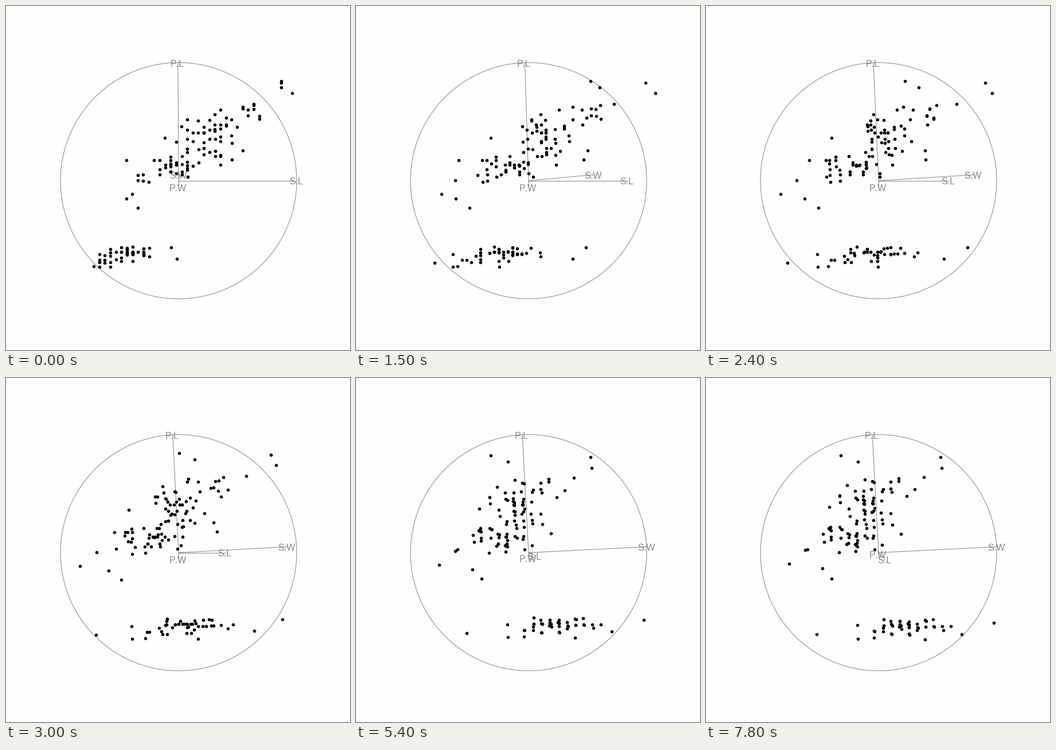
A matplotlib script for the animation above (8 s loop, 600 by 600 pixels).

```python
import numpy as np
import matplotlib.pyplot as plt
from matplotlib.animation import FuncAnimation
from matplotlib.patches import Circle

SIZE, DPI = 600, 100
PX = 72 / DPI                       # one pixel in points
RING_CENTRE, RADIUS = np.array([301, 304.7]), 206
CLOUD_CENTRE, SCALE = np.array([300.4, 304.7]), 348
TICKS, TICK_MS = 80, 100
HOLDS = {1, 8, 10, 16, 25, 31, 36}  # ticks that repeat the previous picture
TURN_END = 39                       # tick at which the sideways turn stops
GREY = "#868686"

NAMES = ["S.L", "S.W", "P.L", "P.W"]
MEAN = np.array([5.843, 3.057, 3.758, 1.199])
SPAN = np.array([3.6, 2.4, 5.9, 2.4])

plt.rcParams["text.kerning_factor"] = 6   # practically no kerning
rng = np.random.default_rng(7)


def cluster(mean, sd, width_corr, petal_corr, outer, total=50):
    """A few outer points plus a correlated normal core, rounded to 0.1."""
    z = np.clip(rng.standard_normal((total - len(outer), 3)), -1.9, 1.9)
    for col, corr in ((1, width_corr), (2, petal_corr)):
        z[:, col] = corr * z[:, 0] + np.sqrt(1 - corr ** 2) * z[:, col]
    return np.vstack([outer, np.round(np.array(mean) + z * sd, 1)])


# Columns: sepal length, sepal width, petal length
flowers = np.vstack([
    cluster((5.0, 3.42, 1.47), (.30, .29, .15), .7, .2,
            [(5.7, 4.4, 1.5), (4.5, 2.3, 1.3), (5.8, 4.0, 1.2),
             (4.3, 3.0, 1.1), (4.6, 3.6, 1.0)]),
    cluster((5.97, 2.81, 4.37), (.44, .23, .33), .4, .6,
            [(5.0, 2.0, 3.5), (6.0, 2.2, 4.0), (4.9, 2.4, 3.3),
             (5.1, 2.5, 3.0), (7.0, 3.2, 4.7)]),
    cluster((6.48, 2.97, 5.45), (.44, .25, .38), .35, .7,
            [(7.7, 2.6, 6.9), (7.7, 2.8, 6.7), (7.7, 3.8, 6.7),
             (7.9, 3.8, 6.4), (4.9, 2.5, 4.5), (7.2, 3.6, 6.1)]),
])
petal_width = np.minimum(0.416 * flowers[:, 2] - 0.363, 2.1)
data = (np.column_stack([flowers, petal_width]) - MEAN) / SPAN


def basis(tick):
    """Four axis tips on the plane: a turn sideways, then a slow one upright."""
    turn = np.radians(2.229 * min(tick, TURN_END))
    tilt = np.radians(2.0 * max(tick - TURN_END, 0))
    across = [np.cos(turn), np.sin(turn), -0.005 - 0.048 * np.sin(turn), 0]
    up = [-0.056 * np.sin(tilt), 0.05, 0.998, -0.056 * np.cos(tilt)]
    return np.column_stack([across, up])


def place(points, centre, scale):
    return centre + points * (scale, -scale)


fig = plt.figure(figsize=(SIZE / DPI, SIZE / DPI), dpi=DPI, facecolor="#fefdff")
ax = fig.add_axes([0, 0, 1, 1])
ax.set_xlim(0, SIZE)
ax.set_ylim(SIZE, 0)
ax.axis("off")

ax.add_patch(Circle(RING_CENTRE, RADIUS, fill=False, ec=GREY, lw=PX))
spokes = [ax.plot([], [], color=GREY, lw=PX)[0] for _ in NAMES]
labels = [ax.text(0, 0, name, color=GREY, ha="center", va="baseline",
                  family="Liberation Sans", size=16 * PX, zorder=3)
          for name in NAMES]
dots, = ax.plot([], [], "o", color="black", ms=5.6 * PX, mew=0, zorder=4)


def draw(tick):
    while tick in HOLDS:
        tick -= 1
    axes = basis(tick)
    tips = place(axes, RING_CENTRE, RADIUS)
    for (x, y), spoke, label in zip(tips, spokes, labels):
        spoke.set_data([RING_CENTRE[0], x], [RING_CENTRE[1], y])
        label.set_position((round(x - 1.2), round(y + 6.7)))
    # Dots sit on pixel centres
    spots = np.round(place(data @ axes, CLOUD_CENTRE, SCALE)) + 0.5
    dots.set_data(spots[:, 0], spots[:, 1])
    return [*spokes, *labels, dots]


anim = FuncAnimation(fig, draw, frames=TICKS, interval=TICK_MS,
                     init_func=lambda: draw(0), repeat=True, repeat_delay=0)
plt.show()
```
